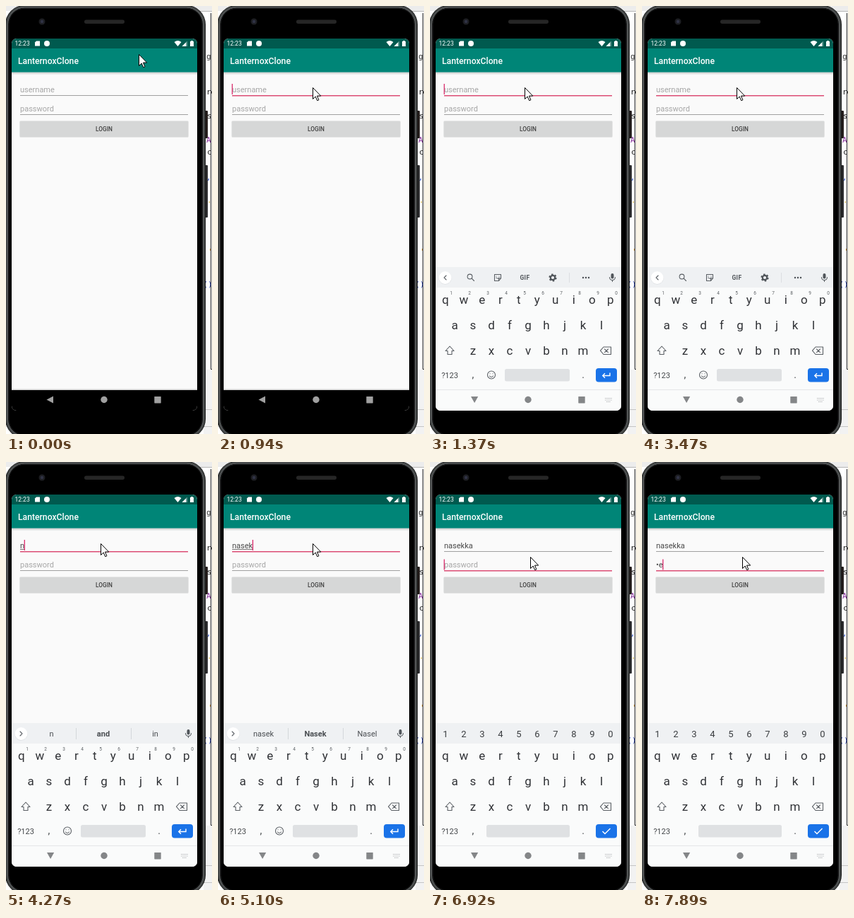
Recreate the animation shown at these times as an HTML page. Size 292x605 px, loop 8000 ms.

```html
<!DOCTYPE html>
<html lang="en">
<head>
<meta charset="utf-8">
<title>Login form</title>
<style>
html, body { margin: 0; width: 100%; height: 100%; overflow: hidden; background: #fff; }
svg { display: block; width: 292px; height: 605px; font-family: Roboto, sans-serif; }
.mono { font: 11px "DejaVu Sans Mono", monospace; }
.mid { text-anchor: middle; }
.line { fill: none; stroke: #5a5f64; stroke-width: 1.1; stroke-linejoin: round; stroke-linecap: round; }
</style>
</head>
<body>
<svg viewBox="0 0 292 605" xmlns="http://www.w3.org/2000/svg">
  <defs>
    <clipPath id="screen"><rect x="8" y="46" width="263" height="526" rx="7"/></clipPath>
    <linearGradient id="shade" x2="0" y2="1">
      <stop stop-color="#000" stop-opacity=".2"/><stop offset="1" stop-color="#000" stop-opacity="0"/>
    </linearGradient>
  </defs>

  <!-- desktop behind the phone -->
  <rect width="292" height="605" fill="#fff"/>
  <rect width="292" height="7" fill="#ececec"/>
  <rect x="270" y="7" width="22" height="1" fill="#b5b5b5"/>
  <rect x="280" y="514" width="12" height="91" fill="#f2f2f2"/>
  <path d="M290.500 10V513.500H292" fill="none" stroke="#222"/>
  <path d="M270 570.500H292M270 594.500H292" stroke="#c4c4c4"/>
  <g class="mono">
    <text x="284" y="75" fill="#333">g</text>
    <text x="284" y="125" fill="#222">re</text>
    <text x="285" y="159" fill="#222">s</text>
    <text x="284" y="193" fill="#86309a">A</text>
    <text x="285" y="210" fill="#222">c</text>
    <text x="284" y="246" fill="#2a4cc0">,</text>
    <text x="285" y="278" fill="#c9a227">.</text>
    <text x="286" y="351" fill="#d08a30">'</text>
    <text x="279.500" y="397" fill="#2a3fa0">()</text>
  </g>

  <!-- phone body -->
  <rect x="281" y="148" width="5" height="39" rx="1" fill="#241d1b"/>
  <rect x="281" y="225" width="5" height="74" rx="1" fill="#2a2a2c"/>
  <rect x="-1" y="-1" width="284" height="612" rx="27" fill="#161717"/>
  <rect x="1.500" y="1" width="279" height="608" rx="25" fill="#000" stroke="#454848" stroke-width="3"/>
  <rect x="2.500" y="2" width="277" height="606" rx="24" fill="none" stroke="#66696a" stroke-width=".8"/>
  <rect x="4" y="3.500" width="274" height="603" rx="22" fill="#000" stroke="#1c1d1e"/>
  <rect x="111" y="19.500" width="57" height="5.500" rx="2.700" fill="#262626"/>
  <circle cx="51" cy="22" r="4.500" fill="#1d1e22"/>
  <circle cx="51" cy="22" r="2.200" fill="#303345"/>

  <g clip-path="url(#screen)">
    <rect x="8" y="46" width="263" height="526" fill="#fafafa"/>
    <rect x="8" y="93.500" width="263" height="4" fill="url(#shade)"/>
    <rect x="8" y="60" width="263" height="33.600" fill="#008577"/>
    <rect x="8" y="46" width="263" height="14" fill="#005a4f"/>
    <g fill="#fff">
      <text x="12.500" y="56" font-size="8.500">12:23</text>
      <path d="M43 49.500H48V56.500H41V51.500Z"/>
      <circle cx="58" cy="53" r="4"/>
      <path d="M238.500 51Q243.500 47 248.500 51L243.500 57Z"/>
      <path d="M249.500 57H257V49.500Z" fill-opacity=".4"/>
      <path d="M249.500 57H255V51.500Z"/>
      <path d="M261 50H262.200V49H264.800V50H266V57H261Z"/>
      <text x="17" y="82" font-size="12.200" font-weight="500">LanternoxClone</text>
    </g>

    <text id="hintUser" x="20" y="122" font-size="11" fill="#a6a6a6">username</text>
    <text id="user" x="20" y="122" font-size="11" fill="#484848"></text>
    <rect id="compose" x="20" y="123" height="1" fill="#777"/>
    <rect id="lineUser" x="20" width="238"/>
    <text id="hintPass" x="20" y="149" font-size="11" fill="#a6a6a6">password</text>
    <text id="pass" x="20" y="149" font-size="11" fill="#484848"></text>
    <rect id="linePass" x="20" width="238"/>
    <rect id="caret" width="1.200" height="15" fill="#d81b60"/>

    <rect x="19.500" y="163.500" width="239" height="22.500" rx="1" fill="#000" fill-opacity=".08"/>
    <rect x="19.500" y="162.500" width="239" height="22.500" rx="1" fill="#d6d7d7"/>
    <text x="139" y="177" class="mid" font-size="8.300" font-weight="500" fill="#404040">LOGIN</text>

    <g id="darkNav">
      <rect x="8" y="541.500" width="263" height="1.500" fill="#d0d0d0"/>
      <rect x="8" y="543" width="263" height="30" fill="#000"/>
      <g fill="#a0a0a0">
        <path d="M57.500 556.500L67 551.500V561.500Z"/>
        <circle cx="139" cy="556.500" r="4.700"/>
        <rect x="210.300" y="552" width="9.400" height="9.400" rx=".6"/>
      </g>
    </g>

    <g id="board">
      <rect x="8" y="369" width="263" height="203" fill="#fafbfb"/>
      <rect x="8" y="369" width="263" height="29" fill="#eff1f3"/>
      <g id="toggle">
        <circle cx="21.500" cy="384.500" r="9.300" fill="#dfe1e4"/>
        <circle cx="21.500" cy="384" r="9" fill="#fff"/>
        <path id="chevron" class="line"/>
        <rect x="256.500" y="378" width="4" height="7.500" rx="2" fill="#50555a"/>
        <path class="line" d="M254.500 383.500a4 4 0 0 0 8 0M258.500 387.500V389.500"/>
      </g>
      <g id="tools">
        <circle cx="56.500" cy="382.500" r="3.400" class="line"/>
        <path class="line" d="M59.200 385.200L62.500 388.500"/>
        <path class="line" d="M92.500 379.500H100.500V385L97.500 388.500H91.500V379.500ZM100.500 385H97.500V388.500M94 384q2 2.500 4 0M94 382h.1M98 382h.1"/>
        <text x="134.500" y="387" class="mid" font-size="8.500" font-weight="700" fill="#50555a" letter-spacing=".4">GIF</text>
        <circle cx="174" cy="384" r="3.200" fill="none" stroke="#50555a" stroke-width="2.200"/>
        <circle cx="174" cy="384" r="4.700" fill="none" stroke="#50555a" stroke-width="1.800" stroke-dasharray="2.460 2.460"/>
        <path d="M197.500 377V391" stroke="#dcdee1"/>
        <g fill="#50555a"><circle cx="217" cy="384" r="1.250"/><circle cx="221" cy="384" r="1.250"/><circle cx="225" cy="384" r="1.250"/></g>
      </g>
      <g id="words" font-size="11" fill="#4a4e52" class="mid">
        <path d="M99.500 376V392M177.500 376V392" stroke="#d4d7da"/>
        <text x="64.500" y="388"></text>
        <text x="138" y="388"></text>
        <text x="211.500" y="388"></text>
      </g>
      <g id="keys" class="mid" fill="#303236" font-size="17"></g>
      <g id="digits" class="mid" fill="#5c6064" font-size="6.500"></g>
      <g id="numbers" class="mid" fill="#3a3d40" font-size="13"></g>
      <path class="line" d="M28 481L34 487.500H31V492.500H25V487.500H22Z"/>
      <path class="line" d="M246 482H256.500V492.500H246L241.500 487.200ZM247.500 485L252.500 489.700M252.500 485L247.500 489.700"/>
      <g class="mid" fill="#44474a">
        <text x="28" y="525.500" font-size="11">?123</text>
        <text x="61" y="525.500" font-size="14">,</text>
        <text x="217" y="525.500" font-size="14">.</text>
      </g>
      <g id="smile">
        <circle cx="87" cy="521.500" r="5.500" class="line"/>
        <path class="line" d="M84.500 523q2.500 3 5 0M85 519.800h.1M89 519.800h.1"/>
      </g>
      <rect id="space" y="513" height="17.500" rx="2.500" fill="#dfe1e3"/>
      <rect x="235" y="512" width="30" height="19.500" rx="4" fill="#1a73e8"/>
      <path id="enter" fill="none" stroke="#fff" stroke-width="1.400"/>
      <path d="M8 542.500H271" stroke="#e4e6e8"/>
      <g fill="#848688">
        <path d="M58 552H68.200L63.100 561Z"/>
        <circle cx="139" cy="556.500" r="4.700"/>
        <rect x="210.300" y="552" width="9.400" height="9.400" rx=".6"/>
      </g>
      <path d="M248 554.500H258M248 557H258M250 559.500H256" stroke="#b4b6b8" stroke-dasharray="1.300 .8"/>
    </g>
  </g>

  <path id="mouse" d="M0 0V16L3.700 12.500L6.200 18.200L8.400 17.300L6 11.600H11.200Z" fill="#fff" stroke="#000" stroke-linejoin="round"/>
</svg>
<script>
const $ = id => document.getElementById(id);
const set = (id, attrs) => { for (const k in attrs) $(id).setAttribute(k, attrs[k]); };
const show = (id, on) => $(id).setAttribute('visibility', on ? 'visible' : 'hidden');

function addText(group, x, y, s) {
  const t = document.createElementNS('http://www.w3.org/2000/svg', 'text');
  t.setAttribute('x', x);
  t.setAttribute('y', y);
  t.textContent = s;
  $(group).append(t);
}

[['qwertyuiop', 21.8, 420.5], ['asdfghjkl', 35, 456.5], ['zxcvbnm', 61, 492.5]].forEach(([row, x, y]) =>
  [...row].forEach((c, i) => addText('keys', x + i * 26, y, c)));
[...'1234567890'].forEach((c, i) => {
  addText('digits', 30 + i * 26, 408, c);
  addText('numbers', 21.8 + i * 26, 389, c);
});

const LOOP = 8000;
// Each list holds [start, value]; a value stays until the next start.
const mouse = [[0, [188.5, 68.5]], [120, [178, 78]], [260, [160, 94]], [400, [141, 110]], [540, [134.5, 115.5]],
  [6210, [134.5, 122.5]], [6350, [139, 129]], [6490, [142.5, 134.5]]];
const caretOn = [[0, 0], [940, 1], [1520, 0], [1900, 1], [2480, 0], [2910, 1], [3470, 0], [4000, 1],
  [5780, 0], [6350, 1], [7310, 0], [7610, 1]];
const userText = [[0, ''], [4140, 'n'], [4280, 'na'], [4420, 'nas'], [4820, 'nase'], [5100, 'nasek'],
  [5240, 'nasekk'], [5380, 'nasekka']];
const passText = [[0, ''], [7610, 'd'], [7890, '•e']];
const rise = [[0, 203], [1220, 34], [1370, 0]];
const guesses = {
  n: ['n', 'and', 'in'], na: ['na', 'an', 'nah'], nas: ['nas', 'was', 'has'], nase: ['nase', 'base', 'name'],
  nasek: ['nasek', 'Nasek', 'Nasel'], nasekk: ['nasekk', 'Nasek', 'Naseka'],
  nasekka: ['nasekka', 'reconnect', 'reconnected']
};
const at = (list, t) => list.reduce((v, [start, x]) => t >= start ? x : v, list[0][1]);

function underline(id, y, focus) {
  set(id, { y, height: focus ? 1.5 : 1, fill: focus ? '#dc4d75' : '#a0a0a0' });
}

function draw(t) {
  const inPass = t >= 6800, inUser = t >= 820 && !inPass;
  const user = at(userText, t), pass = at(passText, t);
  const typing = !inPass && user !== '';

  set('mouse', { transform: `translate(${at(mouse, t)})` });

  $('user').textContent = user;
  $('pass').textContent = pass;
  show('hintUser', !user);
  show('hintPass', !pass);
  const userW = user ? $('user').getComputedTextLength() : 0;
  const passW = pass ? $('pass').getComputedTextLength() : 0;
  set('compose', { width: typing ? userW : 0 });
  underline('lineUser', 126, inUser);
  underline('linePass', 153, inPass);
  set('caret', { x: 19.6 + (inPass ? passW : userW), y: inPass ? 137.5 : 110 });
  show('caret', at(caretOn, t));

  const y = at(rise, t);
  set('board', { transform: `translate(0 ${y})`, opacity: y ? .75 : 1, display: t < 1220 ? 'none' : 'inline' });
  show('darkNav', t < 1220);
  show('toggle', !inPass);
  show('tools', !inPass && !typing);
  show('words', typing);
  show('digits', !inPass);
  show('numbers', inPass);
  show('smile', !inPass);
  set('chevron', { d: typing ? 'M20 381L23 384L20 387' : 'M23 381L20 384L23 387' });
  set('space', inPass ? { x: 80, width: 118 } : { x: 106, width: 92 });
  set('enter', { d: inPass ? 'M244.500 522L248 525.500L255.500 518' : 'M255 518.500V522.500H245M248 519.300L244.800 522.500L248 525.700' });

  if (typing) {
    const words = $('words').querySelectorAll('text');
    guesses[user].forEach((w, i) => { words[i].textContent = w; });
    words[1].setAttribute('font-weight', user === 'nasekka' ? 400 : 700);
  }
}

function tick() {
  draw(performance.now() % LOOP);
  requestAnimationFrame(tick);
}
tick();
</script>
</body>
</html>
```
